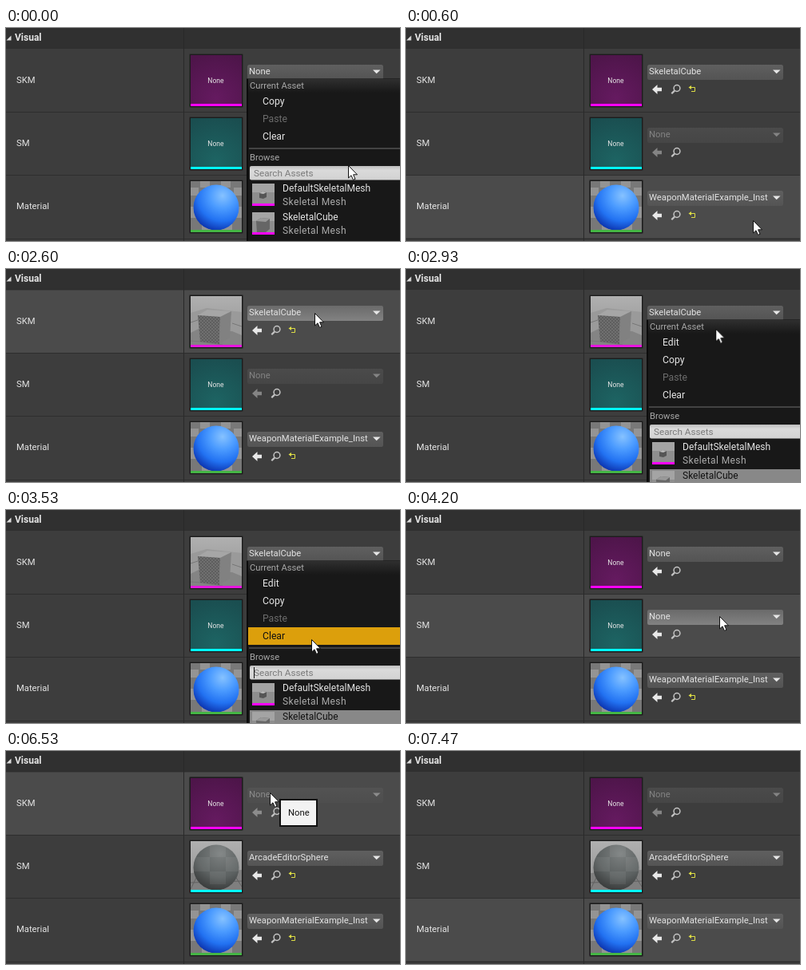
An HTML page that plays this animation: 493x267 px, repeating every 8540 ms.

```html
<!DOCTYPE html>
<html lang="en">
<head>
<meta charset="utf-8">
<title>Visual properties</title>
<style>
  html, body { margin: 0; width: 100%; height: 100%; overflow: hidden; background: #3d3d3d; }
  svg { display: block; width: 493px; height: 267px; }
  text { font: 11.25px Roboto, "Noto Sans", sans-serif; fill: #e4e4e4; white-space: pre; }
  .title { font-weight: 700; font-size: 12px; }
  .small { font-size: 8.6px; text-anchor: middle; }
  .head { font-size: 11.2px; fill: #a9a9a9; }
  .item { font-size: 12.2px; }
  .name { font-size: 12px; }
  .kind { font-size: 12px; letter-spacing: .4px; fill: #adadad; }
  .hint { font-size: 11.7px; fill: #7b7b7b; }
  .off { fill: #6c6c6c; }
  .dark { fill: #111; }
</style>
</head>
<body>
<svg id="stage" viewBox="0 0 493 267"></svg>
<script>
const LOOP = 8540;
const stage = document.getElementById('stage');

const text = (x, y, s, cls = '') => `<text x="${x}" y="${y}" class="${cls}">${s}</text>`;
const rect = (x, y, w, h, fill, more = '') =>
  `<rect x="${x}" y="${y}" width="${w}" height="${h}" fill="${fill}" ${more}/>`;
const path = (d, fill, more = '') => `<path d="${d}" fill="${fill}" ${more}/>`;
const at = (x, y, body) => `<g transform="translate(${x} ${y})">${body}</g>`;
// Visible only during the given ms spans, e.g. "600-3800 5670-8540".
const on = (spans, body) => `<g data-on="${spans}">${body}</g>`;

const defs = `<defs>
  <radialGradient id="purple" cy=".85" r=".9"><stop stop-color="#651a60"/><stop offset="1" stop-color="#4e154a"/></radialGradient>
  <radialGradient id="teal" cy=".85" r=".9"><stop stop-color="#1d6463"/><stop offset="1" stop-color="#1a4e50"/></radialGradient>
  <radialGradient id="blue" cx=".64" cy=".24" r=".82"><stop stop-color="#86c2ff"/>
    <stop offset=".35" stop-color="#4b9bff"/><stop offset=".68" stop-color="#2272f2"/>
    <stop offset="1" stop-color="#0a2ea8"/></radialGradient>
  <radialGradient id="gray" cx=".6" cy=".2" r=".85"><stop stop-color="#7c8080"/>
    <stop offset=".6" stop-color="#5c6161"/><stop offset="1" stop-color="#363838"/></radialGradient>
  <linearGradient id="sky" x2="0" y2="1"><stop stop-color="#b0b0b0"/><stop offset="1" stop-color="#8f8f8f"/></linearGradient>
  <linearGradient id="combo" x2="0" y2="1"><stop stop-color="#5f5f5f"/><stop offset="1" stop-color="#545454"/></linearGradient>
  <linearGradient id="lit" x2="0" y2="1"><stop stop-color="#6a6a6a"/><stop offset="1" stop-color="#828282"/></linearGradient>
  <linearGradient id="band" x2="0" y2="1"><stop stop-color="#2f2f2f"/><stop offset="1" stop-color="#181818"/></linearGradient>
  <linearGradient id="field" x2="0" y2="1"><stop stop-color="#bdbdbd"/><stop offset=".3" stop-color="#dadada"/>
    <stop offset="1" stop-color="#d2d2d2"/></linearGradient>
  <pattern id="check" width="4" height="4" patternUnits="userSpaceOnUse">
    <path d="M0 0h2v2h-2zM2 2h2v2h-2z" fill="#000" opacity=".16"/></pattern>
  <clipPath id="box"><rect width="64" height="64"/></clipPath>
  <clipPath id="ball"><circle cx="32" cy="33" r="28.5"/></clipPath>
</defs>`;

// Thumbnails share a 64 px square with a coloured strip at the bottom.
const frame = rect(-2, -2, 68, 68, '#303030', 'rx="2"') + rect(-1, -1, 66, 66, '#1c1c1c');
const thumb = (body, strip) =>
  `<g clip-path="url(#box)">${body}</g>` + rect(0, 61, 64, 3, strip);
const none = (fill, strip) =>
  thumb(rect(0, 0, 64, 64, fill), strip) + text(31.5, 34.6, 'None', 'small');

const front = 'M9 24L37 26L36 60L12 57Z';
const cube = path('M9 24L21 17L51 19L37 26Z', '#a6a6a6') +
  path(front, '#707070') + path(front, 'url(#check)') +
  path('M37 26L51 19L49 52L36 60Z', '#818181');
const cubeScene = rect(0, 0, 64, 64, 'url(#sky)') +
  path('M0 21L20 15L64 20V64H0Z', '#9a9a9a') +
  path('M0 46L10 41L52 44L64 49V64H0Z', '#848484') +
  path('M0 33L9 30M52 34L64 38M0 56L12 57L40 61', 'none', 'stroke="#777"') + cube;

const grayScene = rect(0, 0, 64, 64, 'url(#sky)') +
  path('M0 40L64 36V64H0Z', '#7f7f7f') +
  path('M0 52L64 50M10 40L0 60M52 38L64 57', 'none', 'stroke="#606060"') +
  '<circle cx="32" cy="33" r="28.5" fill="url(#gray)"/>' +
  `<g clip-path="url(#ball)" opacity=".06">${path('M24 4H44V20H24ZM4 20H24V38H4ZM44 20H62V38H44ZM24 38H44V54H24Z', '#fff')}</g>`;

const blueScene = rect(0, 0, 64, 64, '#949494') +
  path('M0 0H12V8H0ZM24 0H38V8H24ZM50 0H64V8H50ZM10 8H24V18H10ZM42 8H54V18H42ZM0 18H8V32H0ZM56 18H64V32H56ZM0 46H14V64H0ZM52 46H64V64H52Z', '#787878') +
  '<circle cx="32" cy="33" r="28.5" fill="url(#blue)"/>';

const combo = (label, fill = 'url(#combo)') =>
  rect(302, 19, 170, 19, fill, 'rx="2.5"') + text(304, 31, label) +
  path('M459 25.5H468.5L463.7 30.3Z', '#e6e6e6');
const back = path('M308 50L314.5 44V47.7H320V52.3H314.5V56Z', '#e8e8e8');
const lens = '<circle cx="339" cy="48.5" r="3.9" fill="none" stroke="#c4c4c4" stroke-width="1.5"/>' +
  path('M336 51.6L332.3 55.2', 'none', 'stroke="#c4c4c4" stroke-width="2.2"');
const reset = path('M356 47.5H361.5V52.5H357', 'none', 'stroke="#dede45"') +
  path('M353.5 47.5L357 45V50Z', '#dede45');
const dim = body => `<g opacity=".42">${body}</g>`;

const rowAt = i => 27 + 79 * i;
const row = (i, label, thumbs, controls) => at(0, rowAt(i),
  text(13, 42, label) + at(231, 7, frame + thumbs) + lens + controls);

const skm = row(0, 'SKM',
  on('0-730 3867-8540', none('url(#purple)', '#f0f')) +
  on('730-3867', thumb(cubeScene, '#e815e0')),
  on('0-600 3800-5670', combo('None') + back) +
  on('600-3800', combo('SkeletalCube') + back + reset) +
  on('2600-2800', combo('SkeletalCube', 'url(#lit)')) +
  on('5670-8540', dim(combo('None') + back)));

const glow = rect(-1, -1, 66, 66, '#78a455', 'stroke="#c68019" stroke-width="2" rx="1"') +
  rect(0, 61, 64, 3, '#0ff') + text(31.5, 34.6, 'None', 'small');
const sm = row(1, 'SM',
  on('0-5737', none('url(#teal)', '#0ff')) + on('1270-1330', glow) +
  on('5737-8540', thumb(grayScene, '#0ff')),
  on('0-600 3800-5670', combo('None') + back) +
  on('600-3800', dim(combo('None') + back)) +
  on('4067-4400', combo('None', 'url(#lit)')) +
  on('5670-8540', combo('ArcadeEditorSphere') + back + reset));

const material = row(2, 'Material', thumb(blueScene, '#45b545'),
  combo('WeaponMaterialExample_Inst') + back + reset);

const asset = (y, name, shape, dark = '') => at(0, y,
  rect(308, 2, 28, 28, '#8e8e8e') + rect(308, 2, 28, 11, '#a4a4a4') + shape +
  rect(308, 27, 28, 3, '#f0f') +
  text(346, 12.3, name, 'name ' + dark) + text(346, 29, 'Skeletal Mesh', 'kind ' + dark));
const bigCube = path('M313 13L319 9L330 10V23L325 27H314Z', '#666') + path('M313 13L319 9L330 10L325 14Z', '#999');
const tinyCube = path('M317 14L321 12L326 13V19L322 21L317 20Z', '#555') +
  path('M317 14L321 12L326 13L322 15Z', '#bbb');

// y is the top of the popup; the commands come first, then search and asset list.
const menu = (y, commands, list = '', caret = '') => {
  const end = 18 + 22 * commands.length;
  return at(0, y, rect(301, -.5, 200, 300, '#0c0c0c') + rect(303, 0, 200, 300, '#181818') +
    rect(303, 0, 200, 17, 'url(#band)') + text(305, 12, 'Current Asset', 'head') +
    commands.map((c, i) => text(321, 32 + 22 * i, c, c === 'Paste' ? 'item off' : 'item')).join('') +
    rect(304, end + 2.5, 200, 1, '#6e6e6e') + text(305, end + 18, 'Browse', 'head') +
    rect(305, end + 25, 200, 17.5, 'url(#field)', 'rx="2"') +
    text(310, end + 38, 'Search Assets', 'hint') +
    (caret && on(caret, rect(310, end + 27, 1, 14, '#111'))) + at(0, end + 45, list));
};
const hot = (y, label, spans) =>
  on(spans, rect(303, y, 190, 22, '#dc9f0c') + text(321, y + 15, label, 'item dark'));

const assets = asset(0, 'DefaultSkeletalMesh', tinyCube);
const lineHover = rect(305, 0, 190, 35, '#303030');
const firstList = on('152-400', lineHover) + on('400-600', at(0, 36, lineHover)) +
  assets + asset(36, 'SkeletalCube', bigCube);
const secondList = rect(305, 36, 190, 36, '#888') + assets + asset(36, 'SkeletalCube', bigCube, 'dark');

const menus =
  on('0-600', menu(64, ['Copy', 'Paste', 'Clear'], firstList)) +
  on('2800-3800', menu(64, ['Edit', 'Copy', 'Paste', 'Clear'], secondList, '3365-3800')) +
  on('4400-5670', menu(143, ['Copy', 'Paste', 'Clear'], '', '5130-5670')) +
  hot(81, 'Edit', '2985-3200') + hot(103, 'Copy', '3200-3365') + hot(147, 'Clear', '3447-3800') +
  hot(160, 'Copy', '4537-4603') + hot(204, 'Clear', '4670-4737');

const tip = on('6530-7200',
  rect(343, 61, 46, 33, '#f2f2f2', 'stroke="#111" stroke-width="2"') + text(353, 81, 'None', 'dark'));

const pointer = `<g id="pointer">${on('0-7470',
  path('M.5 .5V16L4 12.8L6.5 18.4L9 17.3L6.6 11.8H11.5Z', '#fff', 'stroke="#111" stroke-linejoin="round"'))}</g>`;

// Row under the pointer.
const lit = [['600-1133', 2], ['1133-2402', 1], ['2402-2800', 0], ['3800-4400', 1], ['5870-6137', 2],
  ['6137-6337', 1], ['6337-7267', 0], ['7267-7333', 1], ['7333-8540', 2]]
  .map(([span, i]) => on(span, rect(0, rowAt(i), 493, 78, '#4b4b4b'))).join('');

const lines = [25, 105, 184, 264].map(y => rect(0, y, 493, 1, '#2e2e2e')).join('') +
  rect(222, 0, 1, 267, '#292929');

stage.innerHTML = defs + rect(0, 0, 493, 267, '#3d3d3d') + lit +
  rect(0, 0, 493, 25, '#303030') + lines +
  path('M0.5 15.5H6.5V9.5Z', '#ddd') + text(11, 16, 'Visual', 'title') +
  skm + sm + material + menus + tip + pointer;

const play = (el, frames) => el.animate(frames, { duration: LOOP, iterations: Infinity });

for (const el of stage.querySelectorAll('[data-on]')) {
  const frames = [];
  const mark = (ms, opacity) => frames.push({ offset: ms / LOOP, opacity, easing: 'step-end' });
  const spans = el.dataset.on.split(' ').map(s => s.split('-').map(Number));
  if (spans[0][0] > 0) mark(0, 0);
  for (const [from, to] of spans) {
    mark(from, 1);
    mark(to, to < LOOP ? 0 : 1);
  }
  if (spans.at(-1)[1] < LOOP) mark(LOOP, 0);
  play(el, frames);
}

// Pointer moves: start ms, end ms, x, y, number of visible jumps.
const moves = [
  [70, 400, 434, 241, 5], [1000, 1270, 285, 143, 5], [1330, 1670, 384, 135, 5],
  [2270, 2600, 386, 55, 6], [2730, 3070, 388, 88, 5], [3200, 3530, 382, 162, 5],
  [3800, 4200, 392, 133, 7], [4470, 4870, 400, 285, 7], [5870, 6470, 330, 52, 10],
  [7200, 7400, 205, 232, 4]
];
let transform = 'translate(428px, 172px)';
const route = [{ offset: 0, transform, easing: 'step-end' }];
for (const [start, end, x, y, jumps] of moves) {
  route.push({ offset: start / LOOP, transform, easing: `steps(${jumps - 1}, jump-both)` });
  transform = `translate(${x}px, ${y}px)`;
  route.push({ offset: end / LOOP, transform, easing: 'step-end' });
}
route.push({ offset: 1, transform });
play(document.getElementById('pointer'), route);
</script>
</body>
</html>
```
